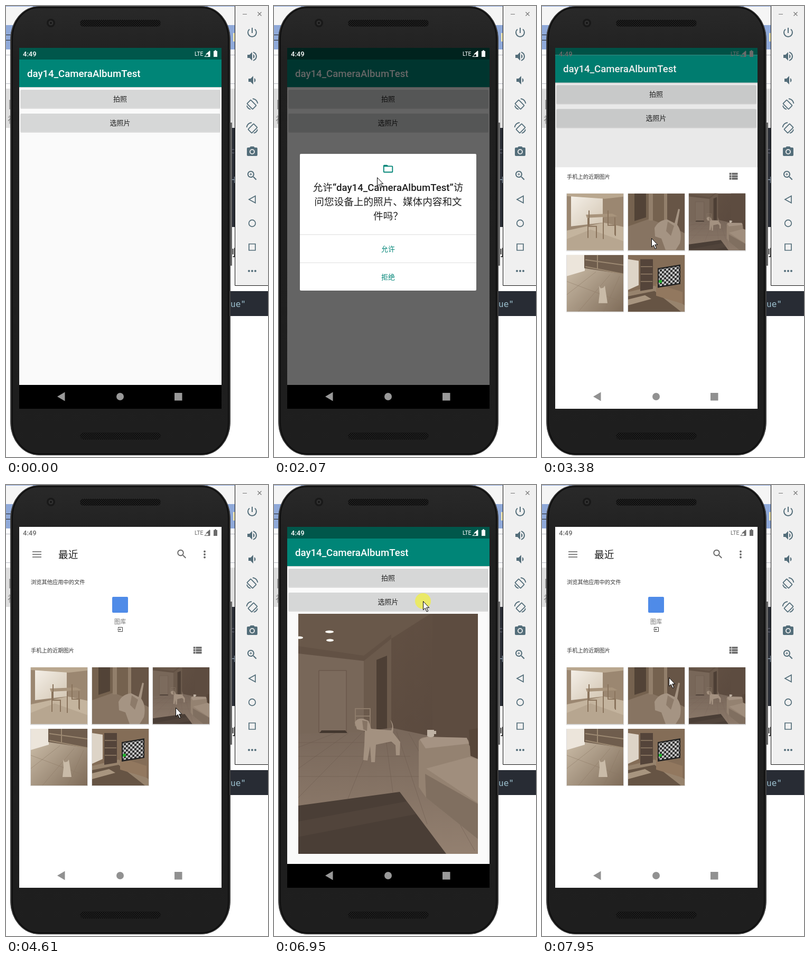
An HTML page for the animation above (8 s loop, 496x851 px).

```html
<!DOCTYPE html>
<html lang="zh-CN">
<head>
<meta charset="utf-8">
<style>
html, body { margin: 0; width: 100%; height: 100%; overflow: hidden; background: #fff; }
svg { display: block; }
text { font-family: Roboto, "Noto Sans CJK SC", "Noto Sans CJK", sans-serif; }
.mid { text-anchor: middle; }
.latin { font-weight: 500; }
.mono { font-family: "DejaVu Sans Mono", monospace; }
.line { fill: none; stroke: currentColor; }
</style>
</head>
<body>
<svg id="stage" width="496" height="851" viewBox="0 0 496 851">
  <defs>
    <clipPath id="screenClip"><path d="M25 79h383v681H25z"/></clipPath>
    <clipPath id="photoClip"><path d="M46 243h340v453H46z"/></clipPath>
    <clipPath id="buttonClip"><rect x="28" y="203" width="377" height="34" rx="2"/></clipPath>
    <clipPath id="allowClip"><path d="M49 432h334v52H49z"/></clipPath>
    <clipPath id="pickerClip"><rect id="reveal" x="25" y="79" width="383" height="681"/></clipPath>
    <linearGradient id="body" x2="0" y2="1">
      <stop stop-color="#292929"/><stop offset=".12" stop-color="#202020"/><stop offset="1" stop-color="#1e1e1e"/>
    </linearGradient>
    <linearGradient id="floor" x2="0" y2="1"><stop stop-color="#78675a"/><stop offset="1" stop-color="#938070"/></linearGradient>
    <linearGradient id="sideWall" x2="1" y2="1"><stop stop-color="#665446"/><stop offset="1" stop-color="#54443a"/></linearGradient>
    <linearGradient id="glow" x2="1" y2="1"><stop stop-color="#f4efe7"/><stop offset="1" stop-color="#d3c6b3"/></linearGradient>
    <linearGradient id="wood" x2="1" y2="1"><stop stop-color="#d3c5b0"/><stop offset="1" stop-color="#7f6c59"/></linearGradient>
    <pattern id="mesh" width="4" height="4" patternUnits="userSpaceOnUse">
      <path fill="#0c0c0c" d="M0 0h4v4H0z"/><path fill="#303030" d="M0 0h1.5v1.5H0zM2 2h1.5v1.5H2z"/>
    </pattern>
    <pattern id="checker" width="8" height="8" patternUnits="userSpaceOnUse" patternTransform="skewY(-8)">
      <path fill="#ccc" d="M0 0h8v8H0z"/><path fill="#2a2a2a" d="M0 0h4v4H0zM4 4h4v4H4z"/>
    </pattern>
    <path id="search" d="M15.5 14h-.79l-.28-.27C15.41 12.59 16 11.11 16 9.5 16 5.91 13.09 3 9.5 3S3 5.91 3 9.5 5.91 16 9.5 16c1.61 0 3.09-.59 4.23-1.57l.27.28v.79l5 4.99L20.49 19l-4.99-5zm-6 0C7.01 14 5 11.99 5 9.5S7.01 5 9.5 5 14 7.01 14 9.5 11.99 14 9.5 14z"/>
    <g id="rotate" class="line" stroke-width="1.800">
      <rect x="-7.500" y="-5" width="15" height="10" rx="1" transform="translate(-1 1) rotate(45)"/>
      <path d="M1 -10q8 1 9.500 9M-10 3q1 5 7 7"/>
    </g>
    <g id="photo" clip-path="url(#photoClip)">
      <path fill="url(#sideWall)" d="M46 243h340v453H46z"/>
      <path fill="#69584a" d="M46 243h250L222 290l-52 42-124-14z"/>
      <path fill="#625144" d="M46 304l124 18 52-40v10l-52 42-124-16z"/>
      <path fill="#786759" d="M46 318l124 14v138H46z"/>
      <path fill="#6b5a4c" d="M170 332l52-42v178h-52z"/>
      <path fill="#4d3f35" d="M194 330l20-8v140h-20z"/>
      <path fill="#7c6b5d" stroke="#625144" d="M85 350h52v117H85z"/>
      <path fill="#5d4c40" d="M300 243h86v257l-86-25z"/>
      <path fill="url(#floor)" d="M46 469l124-3 52-8 80 17 84 25v196H46z"/>
      <path fill="none" stroke="#665549" stroke-opacity=".45" d="M46 495l70-27M46 535l95-67M46 590l120-122M140 592l50-125M225 580l-15-115M290 640l-58-175M380 690L255 468M46 486h190M46 512h212M46 550h228"/>
      <path fill="#43372f" d="M90 463h45l4 5H86z"/>
      <path fill="none" stroke="#8d7b6a" stroke-width="2" d="M154 455v-33h28v38M154 436h28"/>
      <path fill="#a39180" d="M153 448q4-9 16-7l10 4 5 15 38 3q4-8-2-20 8 8 5 24l14 18-1 25h-7l-1-19-8-7-29 6-2 33h-7l-2-30-5 27-8-1 2-27 1-28-15-3z"/>
      <path fill="#867464" d="M167 444l10 2-1 18-7-3z"/>
      <path fill="#948271" d="M274 483q4-9 16-7l72 1q8 3 7 13l17 25v153l-98-78-14-20z"/>
      <path fill="#a59383" d="M276 480l14-5 75 2 4 11-82 9z"/>
      <path fill="#806f60" d="M286 545l100 57v66l-98-78z"/>
      <path fill="#a08e7d" d="M288 535l82-22 16 5v82z"/>
      <path fill="#574639" d="M369 462l17-3v58l-14-6z"/>
      <path fill="#bfb2a4" d="M290 462h13v12q-6 4-13 0zM303 464h4v6h-4z"/>
      <path fill="#4a3e36" d="M46 605l192-26 88 117H46z"/>
      <path fill="#594b41" opacity=".5" d="M46 635l205-38 18 24-223 43z"/>
      <g fill="#fffdf5"><ellipse cx="105" cy="277" rx="8" ry="2.6"/><ellipse cx="106" cy="293" rx="7" ry="2.6"/><ellipse cx="48" cy="288" rx="7" ry="2.4"/></g>
    </g>
  </defs>

  <!-- desktop behind the emulator -->
  <path fill="#fff" d="M0 0h496v851H0z"/>
  <path fill="#f5f5f5" d="M0 0h434v36H0z"/>
  <path fill="#86a2dc" d="M0 0h434v1H0z"/>
  <path fill="#8fa9d9" d="M0 36h434v46H0z"/>
  <path fill="#222" d="M0 54h9v1H0zM0 64h9v1H0z"/>
  <path fill="#f0e6b0" d="M430 51h4v16h-4z"/>
  <path fill="#b9bcc4" d="M0 92h434v1H0zM0 146h434v1H0z"/>
  <path fill="#dedede" d="M0 156h434v74H0z"/>
  <path fill="#999" d="M6 177h4v18H6z"/>
  <text x="3" y="221" font-size="17" fill="#888">视</text>
  <path fill="#282c34" d="M420 230h14v187h-14zM420 538h76v47h-76z"/>
  <text class="mono" x="425" y="278" font-size="14" fill="#667">c</text>
  <text class="mono" x="425" y="334" font-size="16" fill="#9ab">H</text>
  <text x="417" y="472" font-size="18" font-weight="700" fill="#333">制</text>
  <text class="mono" x="425" y="568" font-size="16" fill="#9fc3d2">ue"</text>
  <path fill="#666" d="M424 220h4v270h-4z"/>

  <!-- emulator toolbar -->
  <path fill="#f0f0f0" stroke="#111" d="M433.500 -1V527.500H497V-1z"/>
  <path class="line" color="#777" stroke-width="1.200" d="M448 15.500h8M476.500 11.500l7 7m0-7l-7 7"/>
  <g id="tools" fill="#546e7a" color="#546e7a">
    <path class="line" stroke-width="1.700" d="M472 358.500v13L460 365z"/>
    <circle class="line" cx="466" cy="410" r="6.300" stroke-width="1.700"/>
    <path class="line" stroke-width="1.700" d="M460 449h12v12h-12z"/>
    <circle cx="460" cy="500" r="2"/><circle cx="466" cy="500" r="2"/><circle cx="472" cy="500" r="2"/>
    <use href="#rotate" transform="translate(466 185)"/>
    <use href="#rotate" transform="translate(466 230) scale(-1 1)"/>
    <use href="#search" x="454" y="308"/>
    <path transform="translate(454 308)" d="M12 10h-2v2H9v-2H7V9h2V7h1v2h2z"/>
    <path transform="translate(454 38)" d="M13 3h-2v10h2zm4.830 2.170l-1.420 1.420A7 7 0 1 1 7.580 6.580L6.170 5.170a9 9 0 1 0 11.660 0z"/>
    <path transform="translate(454 83)" d="M3 9v6h4l5 5V4L7 9zm13.500 3c0-1.770-1.020-3.290-2.500-4.030v8.050c1.480-.73 2.500-2.250 2.500-4.020zM14 3.230v2.060c2.890.86 5 3.540 5 6.710s-2.110 5.850-5 6.710v2.060c4.010-.91 7-4.490 7-8.770s-2.990-7.860-7-8.770z"/>
    <path transform="translate(454 128)" d="M18.500 12c0-1.770-1.020-3.290-2.500-4.030v8.050c1.480-.73 2.500-2.250 2.500-4.020zM5 9v6h4l5 5V4L9 9z"/>
    <path transform="translate(454 263)" d="M9 2L7.170 4H4a2 2 0 0 0-2 2v12a2 2 0 0 0 2 2h16a2 2 0 0 0 2-2V6a2 2 0 0 0-2-2h-3.170L15 2zm3 15a5 5 0 1 1 0-10 5 5 0 0 1 0 10zm0-1.800a3.200 3.200 0 1 0 0-6.400 3.200 3.200 0 0 0 0 6.400z"/>
  </g>

  <!-- phone -->
  <rect x="8.500" y=".5" width="416" height="847" rx="54" ry="62" fill="#2d2d2d" stroke="#484848"/>
  <rect x="12" y="3" width="409" height="842" rx="50" ry="58" fill="url(#body)" stroke="#0d0d0d" stroke-width="2"/>
  <circle cx="85" cy="32" r="8" fill="#191919"/><circle cx="85" cy="32" r="4.500" fill="#303030"/><circle cx="85" cy="32" r="2" fill="#151515"/>
  <rect x="140" y="26" width="153" height="13" rx="6.500" fill="url(#mesh)"/>
  <rect x="140" y="805" width="153" height="13" rx="6.500" fill="url(#mesh)"/>

  <g clip-path="url(#screenClip)">
    <path d="M25 79h383v681H25z"/>
    <g id="app">
      <path fill="#fafafa" d="M25 79h383v636H25z"/>
      <path fill="#00574b" d="M25 79h383v22H25z"/>
      <path fill="#008577" d="M25 101h383v52H25z"/>
      <path fill="#000" opacity=".13" d="M25 153h383v1.500H25z"/>
      <text class="latin" x="40" y="134" font-size="18.640" fill="#fff">day14_CameraAlbumTest</text>
      <g fill="#000" fill-opacity=".12"><rect x="27" y="158" width="379" height="36" rx="2"/><rect x="27" y="203" width="379" height="36" rx="2"/></g>
      <g fill="#d6d7d7"><rect x="28" y="158" width="377" height="34" rx="2"/><rect x="28" y="203" width="377" height="34" rx="2"/></g>
      <circle id="buttonRipple" cy="220" clip-path="url(#buttonClip)"/>
      <g class="mid" font-size="13" fill="#222"><text x="216" y="180">拍照</text><text x="216" y="225">选照片</text></g>
      <use id="result" href="#photo"/>
    </g>
    <path id="dim" d="M25 79h383v681H25z"/>
    <g id="dialog">
      <rect x="49" y="279" width="334" height="258" rx="2" fill="#fff"/>
      <path transform="translate(205 296) scale(.92)" fill="#008577" d="M20 6h-8l-2-2H4a2 2 0 0 0-2 2v12a2 2 0 0 0 2 2h16a2 2 0 0 0 2-2V8a2 2 0 0 0-2-2zm0 12H4V8h16z"/>
      <g class="mid" font-size="18.640" fill="#212121">
        <text x="216" y="349">允许<tspan class="latin">“day14_CameraAlbumTest”</tspan>访</text>
        <text x="216" y="376">问您设备上的照片、媒体内容和文</text>
        <text x="216" y="403">件吗？</text>
      </g>
      <path fill="#dedede" d="M49 431h334v1H49zM49 484h334v1H49z"/>
      <circle id="allowRipple" cy="458" clip-path="url(#allowClip)"/>
      <g class="mid" font-size="13" fill="#008577"><text x="216" y="463">允许</text><text x="216" y="516">拒绝</text></g>
    </g>
    <g clip-path="url(#pickerClip)">
      <g id="picker">
        <path fill="#fff" d="M25 79h383v681H25z"/>
        <path fill="#757575" d="M50 125h17v1.800H50zM50 130h17v1.800H50zM50 135h17v1.800H50z"/>
        <text x="99" y="138" font-size="18.640" fill="#212121">最近</text>
        <g fill="#6a6a6a">
          <use href="#search" transform="translate(321.500 119) scale(.95)"/>
          <circle cx="376" cy="125.500" r="1.900"/><circle cx="376" cy="131" r="1.900"/><circle cx="376" cy="136.500" r="1.900"/>
          <path transform="translate(351 300.500) scale(.93)" d="M4 14h4v-4H4zm0 5h4v-4H4zM4 9h4V5H4zm5 5h12v-4H9zm0 5h12v-4H9zM9 5v4h12V5z"/>
        </g>
        <g font-size="10.250" fill="#333"><text x="47" y="187">浏览其他应用中的文件</text><text x="47" y="316">手机上的近期图片</text></g>
        <rect x="201" y="211" width="30" height="30" rx="2" fill="#4f8be8"/>
        <text class="mid" x="216" y="262" font-size="11.200" fill="#757575">图库</text>
        <path class="line" color="#444" d="M212.500 271v-2.500h8v8h-8V274M211 272.500h6m-2-2l2 2-2 2"/>
        <path fill="#000" fill-opacity=".14" d="M46 344h109v109H46zM162 344h109v109H162zM277 344h109v109H277zM46 460h109v108H46zM162 460h109v108H162z"/>
        <svg x="47" y="344" width="107" height="107">
          <path fill="#9b8771" d="M0 0h107v107H0z"/><path fill="url(#glow)" d="M8 5l60 4v46L8 62z"/>
          <path fill="#c4b49e" d="M0 70l70-15 37 8v44H0z"/><path fill="#ab9983" d="M0 86l45-18 62 22v17H0z" opacity=".5"/>
          <path fill="#b9a78f" d="M0 0h107v6L72 10 0 5z"/>
          <path fill="#a8947c" d="M36 40l50-2 10 5-58 3z"/>
          <path class="line" color="#8a745d" stroke-width="2" d="M40 46v38M91 45v33M69 46v40M42 32v30h14v22M78 32v28h14v20"/>
        </svg>
        <svg x="163" y="344" width="107" height="107">
          <path fill="#75624f" d="M0 0h107v107H0z"/><path fill="#877462" d="M0 62l40-14 67 25v34H0z"/>
          <path fill="#524337" d="M12 0h22v45L12 52z"/><path fill="#927f6b" d="M39 0h8v51h-8zM68 0h6v58h-6z"/><path fill="#675546" d="M74 0h33v75L74 58z"/>
          <path fill="#a59483" d="M50 65q8-15 24-16l14 7 7-27 3 1-5 29q10 14 5 35l-8 13H71l-8-22-12-4z"/><path fill="#8d7b6a" d="M75 53l12 8-6 19-9-9z"/>
        </svg>
        <svg x="278" y="344" width="107" height="107" viewBox="46 299.500 340 340"><use href="#photo"/></svg>
        <svg x="47" y="460" width="107" height="107">
          <path fill="url(#wood)" d="M0 0h107v107H0z"/><path fill="#ece5db" d="M0 0h34v30L0 40z"/>
          <path fill="#6f5d4d" d="M33 0h74v36L33 25z"/><path class="line" color="#9c8972" stroke-width="2" d="M35 9l72 10M35 22l72 14M58 0v26"/>
          <path class="line" color="#8b7865" opacity=".5" d="M0 75l55-43M22 107l60-70M0 50l107 40M70 107l30-67"/>
          <path fill="#c9bba8" d="M61 58l3 5 5-1 3-4 2 13 3 20H60l2-18z"/>
        </svg>
        <svg x="163" y="460" width="107" height="107">
          <path fill="#846d57" d="M0 0h107v107H0z"/><path fill="#ddd4c7" d="M0 8l20 3v46L0 66z"/><path fill="#97836d" d="M0 70l50-12 57 37v12H0z"/>
          <path fill="#54443a" d="M23 8h24v56l-24 4z"/><path class="line" color="#937f69" stroke-width="1.500" d="M24 22h22M24 36h22M24 50h22"/>
          <path fill="#665444" d="M0 78l50-10 50 39H0z"/><path fill="#a8957f" d="M0 84l32-8 12 7-44 12z"/>
          <path fill="#92785f" d="M53 54l50 16v22L53 77z"/><path fill="#222" d="M56 25l43-7v37l-43 7z"/><path fill="url(#checker)" d="M58 27l39-6v32l-39 6z"/>
          <circle cx="61" cy="50" r="3" fill="#20b52c"/>
        </svg>
      </g>
    </g>
    <g id="status">
      <text class="latin" x="32" y="95" font-size="13">4:49</text>
      <text x="357" y="94" font-size="10.500">LTE</text>
      <path d="M386 84v11h-3v-4h-5zM393 85h2v-1.500h3V85h2v11h-7z"/>
      <path class="line" d="M376 95.500l10-10.500v10.500z"/>
      <path class="line" d="M382 91l4 4m0-4l-4 4" stroke-opacity=".6"/>
    </g>
    <g id="nav"><path d="M97 737l14.500-8.500v17z"/><circle cx="216" cy="737" r="7"/><path d="M319 730h14.500v14.500H319z"/></g>
  </g>
  <g id="cursor">
    <circle id="halo" r="15" fill="#f0ee48" fill-opacity=".78"/>
    <path fill="#fff" stroke="#000" d="M.5 .5v16.200l3.700-3.500 3 6.900 2.500-1.100-3-6.600h5z"/>
  </g>
</svg>
<script>
const LOOP = 8000;
const el = Object.fromEntries([...document.querySelectorAll('[id]')].map(node => [node.id, node]));
const set = (node, attrs) => { for (const key in attrs) node.setAttribute(key, attrs[key]); };
const show = (node, on) => set(node, { visibility: on ? 'visible' : 'hidden' });
const within = (t, from, to) => t >= from && t < to;
const ramp = (t, from, to) => Math.min(1, Math.max(0, (t - from) / (to - from)));
const ease = x => { const s = x * x * (3 - 2 * x); return 1 - (1 - s) ** 2; };
const shift = (node, x, y) => set(node, { transform: `translate(${x} ${y})` });

// time, x, y of the pointer tip
const path = [
  [70, 403, 778], [830, 279, 260], [980, 276, 225], [1950, 276, 225], [2070, 195, 323],
  [2580, 207, 438], [4000, 207, 438], [4300, 258, 473], [4610, 321, 420], [4740, 327, 410],
  [6200, 327, 410], [6370, 324, 438], [6880, 282, 219], [7400, 282, 219], [7900, 240, 363]
];
const clicks = [[1050, 1200], [2610, 2760], [4740, 4920], [6900, 7090]];

function pointer(t) {
  const i = path.findIndex(p => p[0] > t);
  if (i < 0) return path.at(-1).slice(1);
  if (i === 0) return path[0].slice(1);
  const [a, b] = [path[i - 1], path[i]], k = ramp(t, a[0], b[0]);
  return [a[1] + (b[1] - a[1]) * k, a[2] + (b[2] - a[2]) * k];
}

function ripple(node, t, start, x) {
  const grow = ramp(t, start, start + 120);
  set(node, {
    cx: x + (216 - x) * grow, r: 220 * grow,
    'fill-opacity': t < start ? 0 : .12 * (1 - ramp(t, start + 160, start + 300))
  });
}

function draw(t) {
  const open = t < 5200 ? ease(ramp(t, 3200, 3610))
    : t < 7000 ? 1 - ease(ramp(t, 5200, 5550)) : ease(ramp(t, 7380, 7800));
  const leaving = Math.max(0, t - 2750);

  shift(el.app, 0, -13 * open);
  show(el.result, t >= 5200);
  ripple(el.buttonRipple, t, t < 5000 ? 1130 : 6960, t < 5000 ? 276 : 282);
  ripple(el.allowRipple, t, 2640, 207);

  const dim = .6 * Math.min(ramp(t, 1600, 1830), 1 - ramp(t, 2775, 2937));
  set(el.dim, { 'fill-opacity': Math.max(dim, .1 * open) });
  show(el.dialog, within(t, 1600, 2990));
  shift(el.dialog, 0, leaving ** 2 * .01258);
  set(el.dialog, { opacity: Math.max(0, 1 - leaving / 276) });

  show(el.picker, open > 0);
  shift(el.picker, 0, 28 * (1 - open));
  set(el.reveal, { y: 79 + 653 * (1 - open) });
  set(el.status, { fill: open > .5 ? '#6b6b6b' : '#fff', color: open > .5 ? '#6b6b6b' : '#fff' });
  set(el.nav, open > .5 ? { fill: '#000', 'fill-opacity': .43 } : { fill: '#fff', 'fill-opacity': .6 });

  show(el.cursor, t >= 70);
  show(el.halo, clicks.some(([from, to]) => within(t, from, to)));
  shift(el.cursor, ...pointer(t));
}

function tick() {
  draw(performance.now() % LOOP);
  requestAnimationFrame(tick);
}
tick();
</script>
</body>
</html>
```
